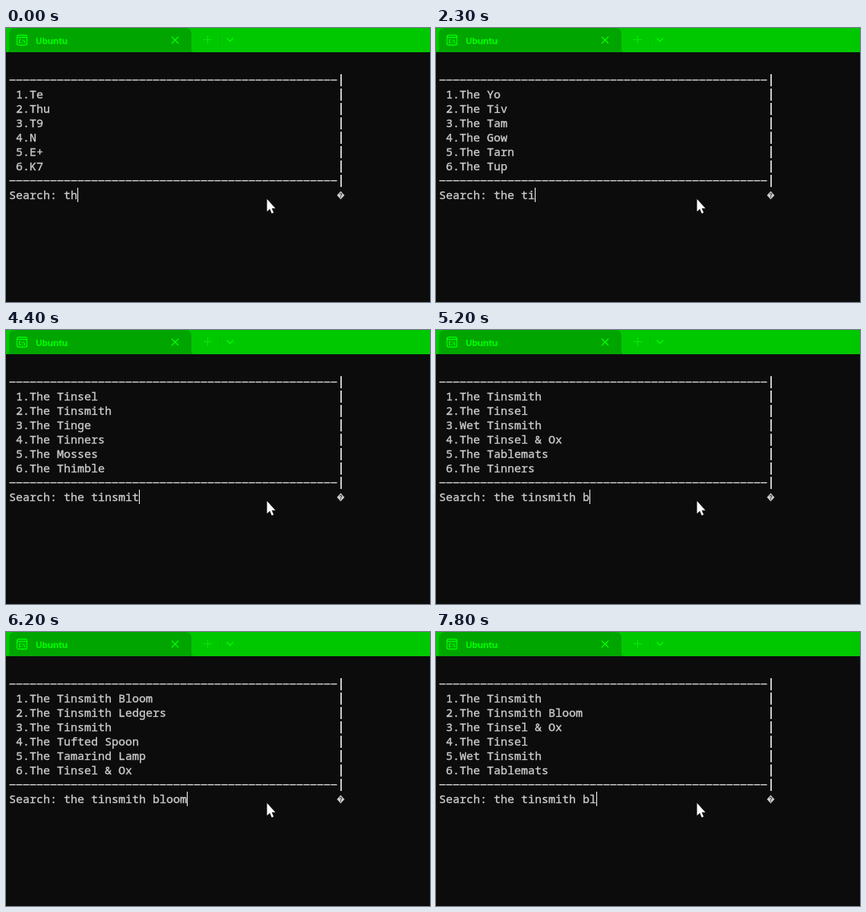
These frames come from a looping animation (558 px wide and 362 px high, 8000 ms). An HTML page:

```html
<!DOCTYPE html>
<html lang="en">
<head>
<meta charset="utf-8">
<title>Terminal search</title>
<style>
  html, body { margin: 0; width: 100%; height: 100%; overflow: hidden; background: #0c0c0c; }
  svg { display: block; width: 558px; height: 362px; }
  .mono { font: 15px "Noto Sans Mono", monospace; fill: #ccc; stroke: #ccc; stroke-width: .35px; white-space: pre; }
  .title { font: 600 11.5px "Open Sans", sans-serif; fill: #0f0; stroke: #0f0; stroke-width: .4px; }
  .line { fill: none; stroke: #0f0; stroke-width: 1.3px; }
  .thin { stroke-width: 1px; }
</style>
</head>
<body>
<svg id="stage" viewBox="0 0 558 362" xmlns="http://www.w3.org/2000/svg">
  <rect width="558" height="362" fill="#0c0c0c"/>
  <rect width="558" height="32" fill="#00c800"/>
  <path d="M0 32Q4 32 4 28V8Q4 0 12 0H236Q244 0 244 8V28Q244 32 248 32Z" fill="#00a500"/>
  <g class="line">
    <rect x="14.5" y="9.5" width="13" height="13" rx="2"/>
    <path d="M14.5 12.5H27.5M19.5 15.5H17.5V19.5H19.5M21.5 15.5V16.8M21.5 18.3V19.5M23 15.5L25 20"/>
    <path d="M218 11.5L227 20.5M227 11.5L218 20.5"/>
    <path class="thin" d="M260 15.5H271M265.5 10V21" stroke="#00f000"/>
    <path class="thin" d="M281.5 8V24" stroke="#00bc00"/>
    <path d="M290.5 13.5L294.7 17.7L299 13.5"/>
  </g>
  <text class="title" x="39" y="21">Ubuntu</text>
  <g id="frame" fill="#ccc"></g>
  <g id="lines"></g>
  <rect id="caret" width="1" height="19" fill="#fff"/>
  <path d="M440.5 215.5L445.5 221L440.5 226.5L435.5 221Z" fill="#ccc"/>
  <path d="M439 219.5Q440.5 217.5 442 219.3Q442 220.5 440.5 221.5V222.5M440.5 223.5V224.5" fill="none" stroke="#0c0c0c"/>
  <path d="M343.5 226V242.5L347.2 239L349.7 245L352.2 244L349.7 238.2H354.5Z" fill="#fff"/>
</svg>
<script>
const LOOP = 8000, CELL = 9, ROW = 19, LEFT = 4, BASE = 93;
const PHRASE = "the tinsmith bloom";
const HALF = "~Tinsmith Bloom,~Tinsmith,~Tinsel & Ox,~Tinsmith Ledgers,~Tablemats,~Tinsel";
const MOST = "~Tinsmith Bloom,~Tinsmith,~Tinsmith Ledgers,~Tufted Spoon,~Tinsel & Ox,~Tamarind Lamp";
const SHORT = "~Tinsmith,~Tinsmith Bloom,~Tinsel & Ox,~Tinsel,Wet Tinsmith,~Tablemats";

// [start ms, typed letters, results ("~" is "The "), echoed keys]
const steps = [
  [0, 2, "Te,Thu,T9,N,E+,K7"],
  [400, 3, "Te,Thu,T9,N,E+,K7"],
  [500, 3, "Thu,Tew,Thole,Te,~Yo,Het"],
  [800, 4, "~Up,~Tam,Thole,Thew,~Nib,Thu"],
  [1800, 5, "~Up,~Tup,~Yo,~Tiv,~Tam,~Gow"],
  [2300, 6, "~Yo,~Tiv,~Tam,~Gow,~Tarn,~Tup"],
  [2800, 7, "~Tine,~Tup,~Nib,~Twig,~Tilth,~Tarn"],
  [3200, 8, "~Tined,~Twig,~Tup,~Tilth,~Tine,~Nib"],
  [3800, 9, "~Tinsel,~Tinge,~Tined,~Tinners,~Twig,~Tilth"],
  [4100, 10, "~Tinsel,~Tinge,~Tinners,~Tined,~Thimble,~Mosses"],
  [4300, 11, "~Tinsel,~Tinge,~Tinners,~Tined,~Thimble,~Mosses"],
  [4400, 11, "~Tinsel,~Tinsmith,~Tinge,~Tinners,~Mosses,~Thimble"],
  [4500, 12, "~Tinsel,~Tinsmith,~Tinge,~Tinners,~Mosses,~Thimble"],
  [4600, 12, "~Tinsmith,~Tinsel,Wet Tinsmith,~Tinners,~Tinge,~Mosses"],
  [4900, 13, "~Tinsmith,Wet Tinsmith,~Tinsel,~Tinsel & Ox,~Tinners,~Tinge"],
  [5200, 14, "~Tinsmith,~Tinsel,Wet Tinsmith,~Tinsel & Ox,~Tablemats,~Tinners"],
  [5400, 15, SHORT],
  [5800, 16, HALF],
  [6100, 17, MOST],
  [6200, 18, "~Tinsmith Bloom,~Tinsmith Ledgers,~Tinsmith,~Tufted Spoon,~Tamarind Lamp,~Tinsel & Ox"],
  [7200, 17, MOST],
  [7300, 17, MOST, "^?"],
  [7400, 16, HALF],
  [7800, 15, SHORT]
];

const byId = id => document.getElementById(id);
function add(parent, tag, attrs) {
  const node = document.createElementNS("http://www.w3.org/2000/svg", tag);
  for (const key in attrs) node.setAttribute(key, attrs[key]);
  return byId(parent).appendChild(node);
}

for (const y of [68, 201])
  for (let i = 0; i < 48; i++)
    add("frame", "rect", { x: LEFT + 0.4 + i * CELL, y, width: 8.2, height: 1.5 });
for (let i = 0; i < 8; i++)
  add("frame", "rect", { x: 440, y: 61 + i * ROW, width: 2, height: 16 });

const rows = Array.from({ length: 6 }, (_, i) =>
  add("lines", "text", { class: "mono", x: LEFT + CELL, y: BASE + i * ROW }));
const search = add("lines", "text", { class: "mono", x: LEFT, y: BASE + 7 * ROW });
const caret = byId("caret");
let shown;

function show([, typed, results, echo = ""]) {
  results.split(",").forEach((name, i) => {
    rows[i].textContent = `${i + 1}.${name.replace("~", "The ")}`;
  });
  const text = "Search: " + PHRASE.slice(0, typed) + echo;
  search.textContent = text;
  // An echoed key leaves the caret on the next line.
  caret.setAttribute("x", echo ? LEFT : LEFT + text.length * CELL);
  caret.setAttribute("y", echo ? 230 : 211);
}

const start = performance.now();
function tick() {
  const time = Math.max(0, performance.now() - start) % LOOP;
  const step = steps.findLast(([at]) => at <= time);
  if (step !== shown) show(shown = step);
  requestAnimationFrame(tick);
}
tick();
</script>
</body>
</html>
```
